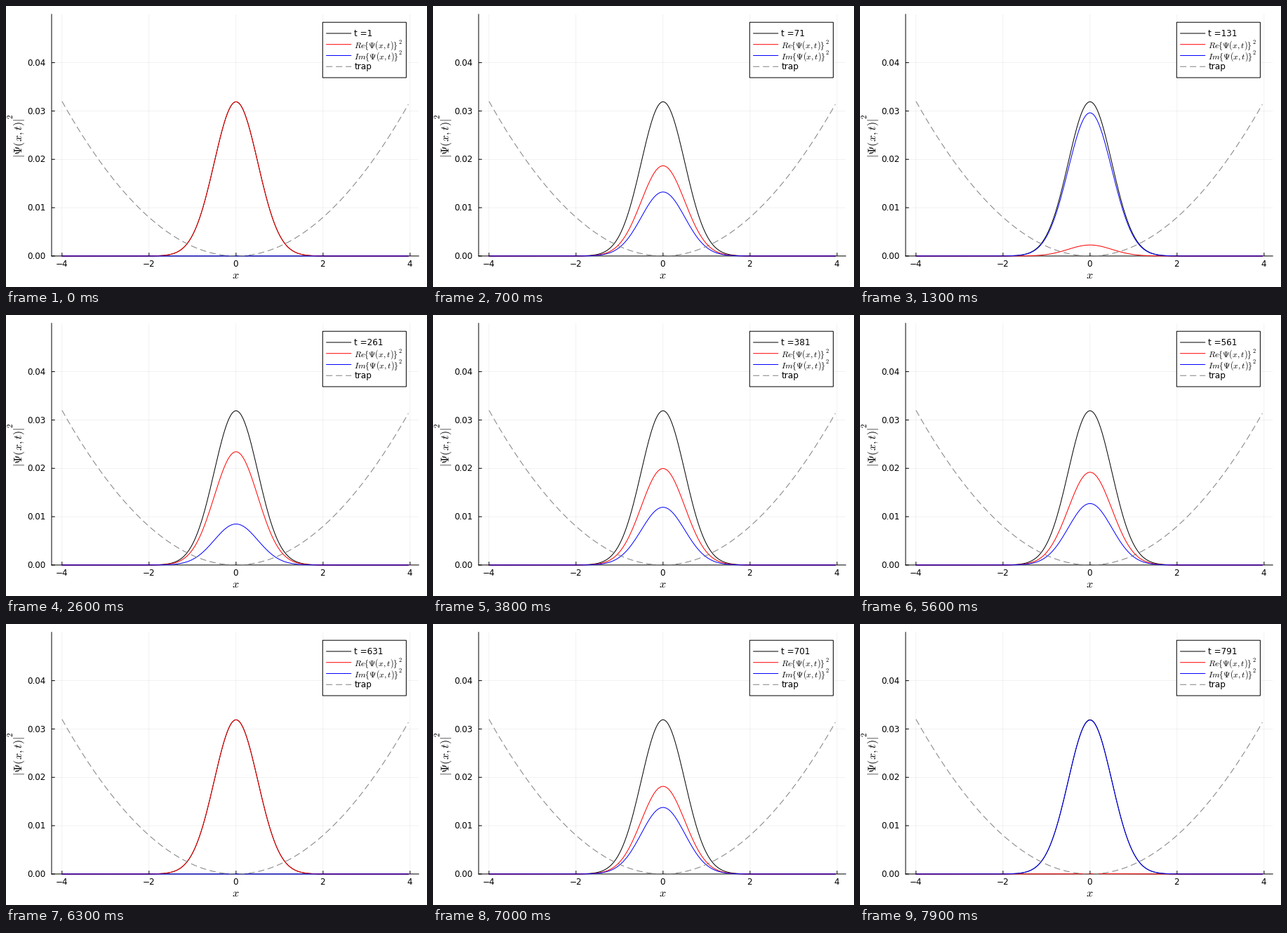
These frames come from a looping animation (600x400 px, 8000 ms). A matplotlib script:

```python
import numpy as np
import matplotlib.pyplot as plt
from matplotlib.animation import FuncAnimation
from matplotlib.lines import Line2D
from matplotlib.patches import Patch, Rectangle

W, H, DPI = 600, 400, 100
FRAMES, INTERVAL = 80, 100
PX = 72 / DPI  # points per pixel
DASH = (0, (9, 5))

plt.rcParams["font.family"] = "DejaVu Sans"
plt.rcParams["mathtext.fontset"] = "cm"

# Ground state of a harmonic trap on a grid
OMEGA, DX = 2.0, 0.04
x = -4 + DX * np.arange(200)
density = DX * np.sqrt(OMEGA / np.pi) * np.exp(-OMEGA * x**2)
trap = 0.5 * OMEGA**2 * x**2 / 1000

fig = plt.figure(figsize=(W / DPI, H / DPI), dpi=DPI, facecolor="white")

# Plot area in pixels
L, R, T, B = 65.0, 588.2, 11.8, 355.9
ax = fig.add_axes([L / W, 1 - B / H, (R - L) / W, (B - T) / H])
pad = 0.03 * (x[-1] - x[0])
x0, x1 = x[0] - pad, x[-1] + pad
ax.set_xlim(x0, x1)
ax.set_ylim(0, 0.05)
xticks = np.arange(-4, 5, 2)
yticks = np.arange(5) / 100
ax.set_xticks(xticks)
ax.set_yticks(yticks)
ax.tick_params(length=0, labelbottom=False, labelleft=False)
ax.grid(color="black", alpha=0.1, linewidth=0.5 * PX)
ax.set_axisbelow(True)
ax.spines[["top", "right"]].set_visible(False)
ax.spines[["left", "bottom"]].set_linewidth(PX)


def curve(y, color, style="-"):
    line, = ax.plot(x, y, color=color, lw=PX, ls=style, zorder=3,
                    dash_capstyle="butt", clip_on=False)
    return line


curve(density, "black")
re_line = curve(density, "red")
im_line = curve(0 * x, "blue")
curve(trap, "gray", DASH)

# Overlay in pixel coordinates for ticks, labels and legend
top = fig.add_axes([0, 0, 1, 1])
top.set_xlim(0, W)
top.set_ylim(H, 0)
top.axis("off")


def segment(xs, ys, color="black", style="-"):
    top.plot(xs, ys, color=color, lw=PX, ls=style,
             solid_capstyle="butt", dash_capstyle="butt")


def label(px, py, text, size=12, ha="left", **kw):
    return top.text(px, py, text, fontsize=size * PX, ha=ha,
                    va="baseline", color="black", **kw)


TICK = 4.7
for v in xticks:
    px = L + (v - x0) / (x1 - x0) * (R - L)
    segment([px, px], [B, B - TICK])
    label(px - 0.7, 371.3, str(v).replace("-", "\u2212"), ha="center")
for v in yticks:
    py = B - v / 0.05 * (B - T)
    segment([L, L + TICK], [py, py])
    label(56.4, py + 4.2, f"{v:.2f}", ha="right")

label(327.4, 388, "$x$", 16, "center")
upright = dict(rotation=90, rotation_mode="anchor")
label(22.8, 216.4, r"$|\Psi(x,t)|$", 16, **upright)
label(10.4, 160.8, "$2$", 11.2, **upright)

# Legend
BX, BY, BW, BH = 451.3, 23.2, 119.1, 78.8
top.add_patch(Rectangle((BX, BY), BW, BH, fc="white", ec="black", lw=PX))
rows = BY + BH / 5 * np.arange(1, 5)
for y, color, style in zip(rows, ("black", "red", "blue", "gray"),
                           ("-", "-", "-", DASH)):
    segment([456.2, 492.2], [y, y], color, style)

TX = 496.4
counter = label(TX, rows[0] + 4.2, "t =1")
# In the calligraphic font, f and g are the text-size braces
for y, part in zip(rows[1:3], ("Re", "Im")):
    label(TX, y + 4.7, rf"${part}\mathcal{{f}}\Psi(x,t)\mathcal{{g}}$")
    label(559.3, y - 1.2, "$2$", 8.4)
label(TX, rows[3] + 4.2, "trap")

for art in fig.findobj(lambda a: isinstance(a, (Line2D, Patch))):
    art.set_snap(False)


def update(k):
    phase = 0.1 * k
    re_line.set_ydata(density * np.cos(phase) ** 2)
    im_line.set_ydata(density * np.sin(phase) ** 2)
    counter.set_text(f"t ={1 + 10 * k}")
    return re_line, im_line, counter


anim = FuncAnimation(fig, update, frames=FRAMES, interval=INTERVAL,
                     repeat=True, repeat_delay=0, blit=False)
plt.show()
```
